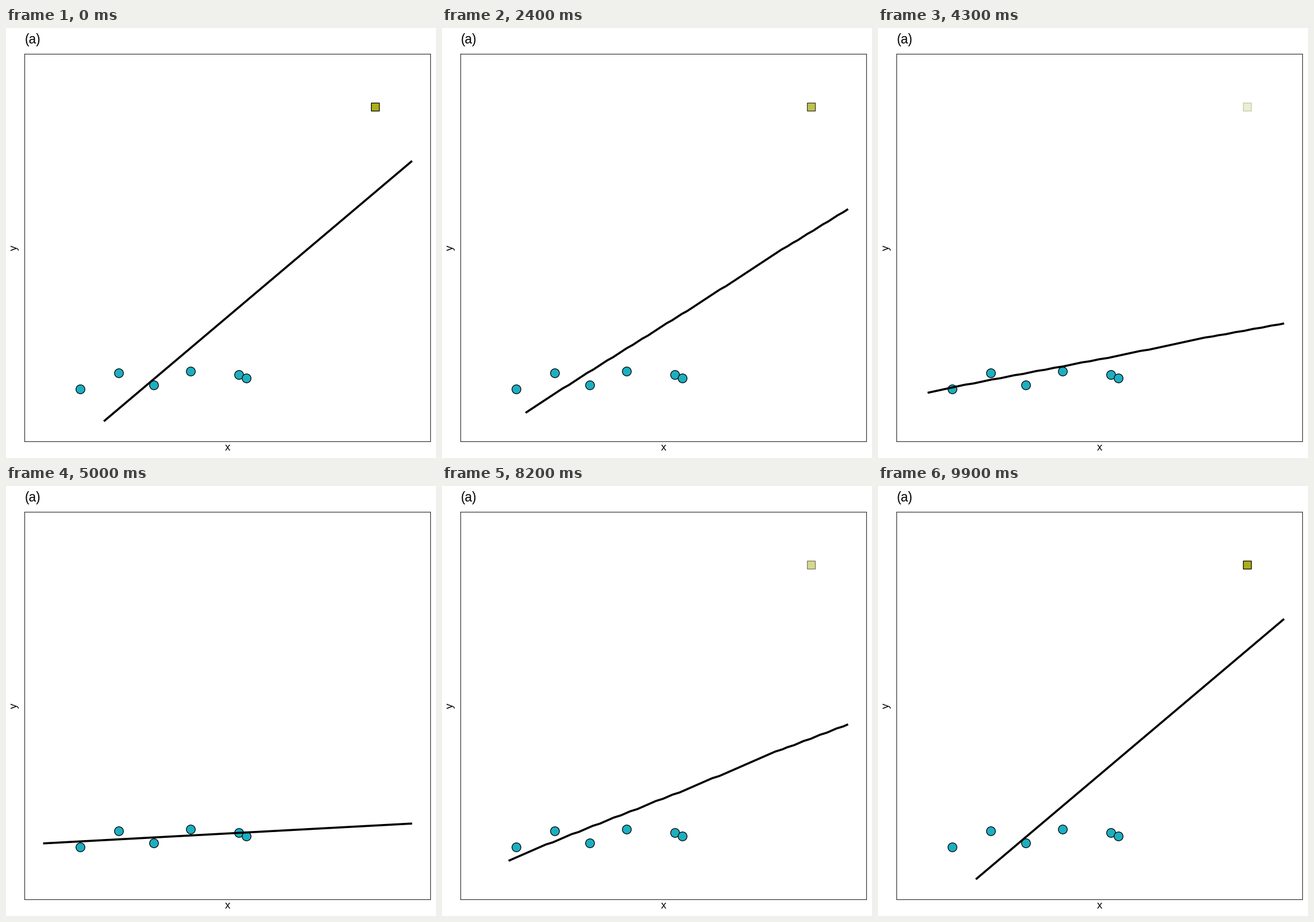
Recreate the animation shown at these times as a matplotlib script. Size 748x748 px, loop 10000 ms.

```python
import numpy as np
import matplotlib.pyplot as plt
from matplotlib.animation import FuncAnimation

SIZE, DPI = 748, 100
FRAMES, INTERVAL = 100, 100
LEFT, RIGHT, TOP, BOTTOM = 32.5, 738.5, 45.5, 719.5
TEAL, OLIVE = "#1CAFC1", "#ABAE17"


def pt(px):
    return px * 72 / DPI


# Six ordinary points, then the outlier
x = np.array([1, 2.04, 3, 4, 5.3, 5.5, 9])
y = np.array([1, 1.45, 1.1, 1.5, 1.4, 1.3, 9])

# Both fits on one 80 point grid; the steep one is cut at y = 0
grid = np.linspace(0, 10, 80)
flat = np.column_stack([grid, np.polyval(np.polyfit(x[:-1], y[:-1], 1), grid)])
steep = np.column_stack([grid, np.polyval(np.polyfit(x, y, 1), grid)])
steep = steep[steep[:, 1] >= 0]

# Halve some segments so both paths have equally many vertices
halved = np.array([8, 13, 17, 21, 24, 29, 32, 40, 53, 55, 58, 61, 64])
steep = np.insert(steep, halved + 1, (steep[halved] + steep[halved + 1]) / 2, axis=0)


def removal(frame):
    """Share of the outlier's weight taken away: 0 is with it, 1 without."""
    return np.interp(frame, [16, 50, 66, 99], [0, 1, 1, 0])


fig = plt.figure(figsize=(SIZE / DPI, SIZE / DPI), dpi=DPI, facecolor="white")
ax = fig.add_axes([LEFT / SIZE, 1 - BOTTOM / SIZE,
                   (RIGHT - LEFT) / SIZE, (BOTTOM - TOP) / SIZE])
ax.set(xlim=(-0.5, 10.5), ylim=(-0.5, 10.5), xticks=[], yticks=[])
for spine in ax.spines.values():
    spine.set(color="#333333", linewidth=pt(1.2), snap=False)


def label(px, py, text, size, **kw):
    fig.text(px / SIZE, 1 - py / SIZE, text, fontsize=pt(size), color="black",
             family="Liberation Sans", va="baseline", **kw)


label(LEFT, 26.5, "(a)", 22.6)
label(385.5, 735, "x", 18.5, ha="center")
label(18.7, 382.5, "y", 18.5, ha="center", rotation=90, rotation_mode="anchor")


def points(px, py, marker, size, fill):
    return ax.plot(px, py, marker, markersize=pt(size), markerfacecolor=fill,
                   markeredgecolor="black", markeredgewidth=pt(1.25),
                   snap=False, zorder=2)[0]


points(x[:-1], y[:-1], "o", 15.5, TEAL)
outlier = points(x[-1:], y[-1:], "s", 13.9, OLIVE)
fit, = ax.plot([], [], color="black", linewidth=pt(3.6), solid_capstyle="butt",
               solid_joinstyle="round", snap=False, zorder=3)


def draw(frame):
    p = removal(frame)
    fit.set_data(*((1 - p) * steep + p * flat).T)
    outlier.set_alpha(1 - p)
    return fit, outlier


anim = FuncAnimation(fig, draw, frames=FRAMES, interval=INTERVAL,
                     repeat=True, repeat_delay=0, blit=False)
plt.show()
```
